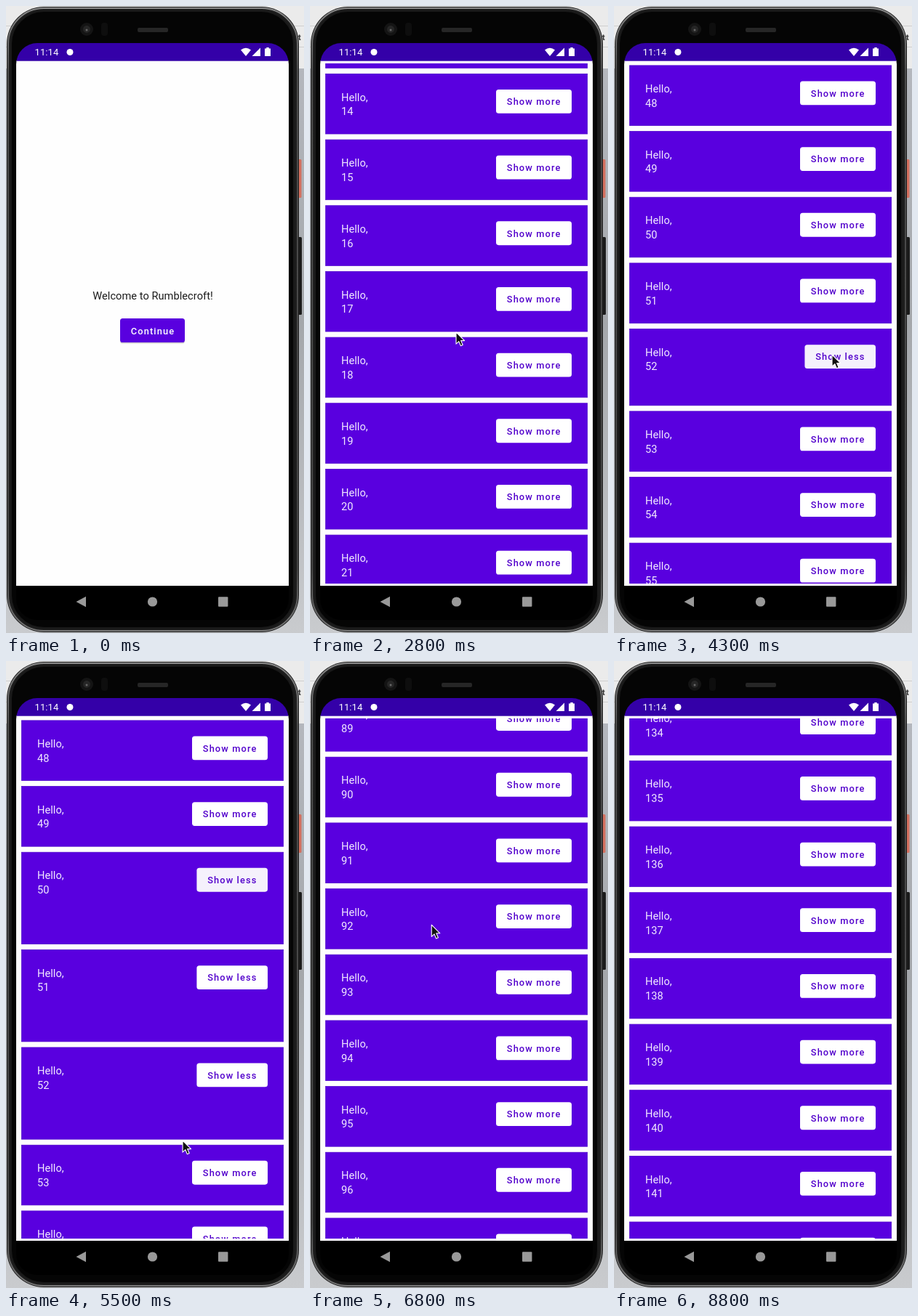
An HTML page that plays this animation: 410 px wide and 863 px high, repeating every 8.9 s.

```html
<!DOCTYPE html>
<html lang="en">
<head>
<meta charset="utf-8">
<title>Scrolling list</title>
<style>
  html, body { margin: 0; width: 100%; height: 100%; overflow: hidden; background: #e9e9e9; }
  svg { display: block; width: 100vw; height: 100vh; font-family: Roboto, sans-serif; }
  .body { font-size: 14.6px; letter-spacing: .05px; }
  .button { font-size: 12.77px; font-weight: 500; letter-spacing: 1.14px; }
</style>
</head>
<body>
<svg viewBox="0 0 410 863">
  <defs>
    <linearGradient id="rim" x1="0" y1="0" x2="0" y2="1">
      <stop offset="0" stop-color="#8a8a8a"/>
      <stop offset=".1" stop-color="#4c4c4c"/>
      <stop offset=".9" stop-color="#444"/>
      <stop offset="1" stop-color="#777"/>
    </linearGradient>
    <linearGradient id="desk" x1="0" y1="0" x2="0" y2="1">
      <stop offset="0" stop-color="#b4b7bd"/>
      <stop offset=".45" stop-color="#a4a7ab"/>
      <stop offset="1" stop-color="#c9cbce"/>
    </linearGradient>
    <clipPath id="screen"><rect x="14" y="51" width="375" height="794" rx="29"/></clipPath>
    <clipPath id="viewport"><rect x="21" y="79" width="361" height="716"/></clipPath>
  </defs>

  <!-- desktop behind the phone -->
  <rect width="410" height="863" fill="#ebebeb"/>
  <path d="M0 27.5H410M0 56.5H410" stroke="#cfcfcf"/>
  <rect y="86" width="410" height="777" fill="url(#desk)"/>
  <text x="402" y="47" font-size="11" font-weight="700" fill="#333">t</text>

  <!-- phone -->
  <rect x="400" y="211" width="6.5" height="53" rx="1.5" fill="#d4705f"/>
  <rect x="400" y="318" width="7" height="107" rx="1.5" fill="#1c1c1c"/>
  <rect x="1" y="1" width="402" height="861" rx="51" fill="#1d1d1d"/>
  <rect x="3" y="3" width="398" height="857" rx="49" fill="none" stroke="url(#rim)" stroke-width="2"/>
  <rect x="7" y="7" width="389" height="849" rx="45" fill="#050505" stroke="#191919" stroke-width="2"/>
  <circle cx="111" cy="32" r="9" fill="#141414"/>
  <circle cx="111" cy="32" r="5" fill="#262626"/>
  <circle cx="111" cy="33" r="1.5" fill="#666"/>
  <rect x="131" y="23" width="9" height="18" rx="4" fill="#0e0e0e"/>
  <rect x="181" y="30" width="42" height="6" rx="2" fill="#262626"/>

  <!-- screen -->
  <g clip-path="url(#screen)">
    <rect x="14" y="75" width="375" height="723" fill="#fefefe"/>
    <rect x="14" y="51" width="375" height="24.7" fill="#3400a8"/>
    <rect x="14" y="798" width="375" height="47"/>
  </g>
  <g fill="#fff">
    <text x="39.5" y="68" font-size="13" letter-spacing=".1">11:14</text>
    <circle cx="88" cy="63.5" r="4.5"/>
    <path d="M323 60.5Q330 55 337 60.5L330 69Z"/>
    <path d="M350 57.5V69H338.5Z"/>
    <path d="M356 58.5H358.3V57H361.7V58.5H364V69H356Z"/>
  </g>
  <g fill="#999">
    <path d="M96.5 820L110 812.8V827.2Z"/>
    <circle cx="201.5" cy="820" r="6.6"/>
    <rect x="292" y="813.3" width="13.4" height="13.4" rx="1"/>
  </g>

  <g id="welcome">
    <text class="body" x="202" y="404" text-anchor="middle" fill="#1c1c1c">Welcome to Rumblecroft!</text>
    <rect x="157" y="431.5" width="89" height="33" rx="3.6" opacity=".2"/>
    <rect x="157" y="430" width="89" height="33" rx="3.6" fill="#5900df"/>
    <text class="button" x="171.8" y="451.7" fill="#fff">Continue</text>
  </g>
  <g id="list" clip-path="url(#viewport)"></g>
  <path id="cursor" d="M0 0V16.2L3.8 12.7L6.4 18.8L9.2 17.5L6.6 11.6H11.6Z" fill="#111" stroke="#fff" stroke-width="1.1" stroke-linejoin="round"/>
</svg>

<script>
const LOOP = 8900, STEP = 100, LIST_AT = 800;
const FIRST_TOP = 82.5, PITCH = 90.67, CARD = 83.4, EXTRA = 43.67;

// Each fling: start time and distance in cards. Longer throws take longer to settle.
const flings = [
  [1150, 1.6], [1750, 12.284], [2800, 34.127],
  [5550, 24.03], [6250, 20], [7034.7, 43.803]
];
const flingTime = cards => 324.5 * cards ** 0.4;

// Cards 52, 51 and 50 are opened one after the other.
const FIRST_OPEN = 50, LAST_OPEN = 52, OPEN_TIME = 300;
const clickTime = n => 4300 + (LAST_OPEN - n) * 450;

// Pointer stops: time, x, y
const stops = [
  [300, 112, 140], [600, 208, 432], [2800, 201, 449], [3500, 246, 378],
  [4300, 300, 480], [5200, 300, 302], [5500, 243, 660], [6200, 238.5, 675],
  [7300, 113, 126], [7800, 111, 14]
];
const POINTER_GONE = 7900;

const byId = id => document.getElementById(id);
const clamp01 = v => Math.min(1, Math.max(0, v));
const easeOut = p => 1 - (1 - clamp01(p)) ** 4;
const mix = (a, b, p) => a + (b - a) * p;

function add(parent, tag, attrs) {
  const el = document.createElementNS("http://www.w3.org/2000/svg", tag);
  set(el, attrs);
  return parent.appendChild(el);
}

function set(el, attrs) {
  for (const key in attrs) el.setAttribute(key, attrs[key]);
}

function makeCard() {
  const group = add(byId("list"), "g", {});
  const box = add(group, "rect", { x: 21.4, y: .4, width: 360.2, fill: "#5900df", stroke: "#4f00cd", "stroke-width": .8 });
  const label = { class: "body", x: 43, fill: "#f3eaff" };
  add(group, "text", { ...label, y: 37.5 }).textContent = "Hello,";
  const number = add(group, "text", { ...label, y: 57.3 });
  const button = add(group, "rect", { y: 22, height: 32.8, rx: 3.6 });
  const caption = add(group, "text", { class: "button", y: 43.2, fill: "#5200cc" });
  return { group, box, number, button, caption };
}
const cards = Array.from({ length: 14 }, makeCard);

function scrolledCards(t) {
  return flings.reduce((sum, [start, d]) => sum + d * easeOut((t - start) / flingTime(d)), 0);
}

function extraHeight(n, t) {
  if (n < FIRST_OPEN || n > LAST_OPEN) return 0;
  return EXTRA * easeOut((t - clickTime(n) + STEP / 2) / OPEN_TIME);
}

function drawList(t) {
  const scroll = scrolledCards(t);
  const first = Math.max(0, Math.floor(scroll) - 4);
  let y = FIRST_TOP + (first - scroll) * PITCH;
  for (let n = FIRST_OPEN; n < first; n++) y += extraHeight(n, t);

  cards.forEach((card, i) => {
    const n = first + i;
    const extra = extraHeight(n, t);
    const open = extra > 0;
    const left = open ? 262.4 : 256;
    const pressed = open && t - clickTime(n) <= OPEN_TIME;
    set(card.group, { transform: `translate(0 ${y.toFixed(2)})` });
    set(card.box, { height: CARD - .8 + extra });
    set(card.button, { x: left, width: 360 - left, fill: pressed ? "#f5f1fc" : "#fff" });
    set(card.caption, { x: left + 14.8 });
    card.number.textContent = n;
    card.caption.textContent = open ? "Show less" : "Show more";
    y += PITCH + extra;
  });
}

function drawPointer(t) {
  const visible = t >= stops[0][0] && t < POINTER_GONE;
  byId("cursor").style.display = visible ? "" : "none";
  if (!visible) return;
  const next = Math.max(1, stops.findIndex(([time]) => time >= t));
  const at = t > stops.at(-1)[0] ? stops.length - 1 : next;
  const [t0, x0, y0] = stops[at - 1], [t1, x1, y1] = stops[at];
  const p = clamp01((t - t0) / (t1 - t0));
  const smooth = p * p * (3 - 2 * p);
  set(byId("cursor"), { transform: `translate(${mix(x0, x1, smooth)} ${mix(y0, y1, smooth)})` });
}

function draw(t) {
  const listShown = t >= LIST_AT;
  byId("welcome").style.display = listShown ? "none" : "";
  byId("list").style.display = listShown ? "" : "none";
  if (listShown) drawList(t);
  drawPointer(t);
}

const begin = performance.now();
function tick() {
  const t = (performance.now() - begin) % LOOP;
  draw(Math.floor(t / STEP) * STEP);
  requestAnimationFrame(tick);
}
tick();
</script>
</body>
</html>
```
